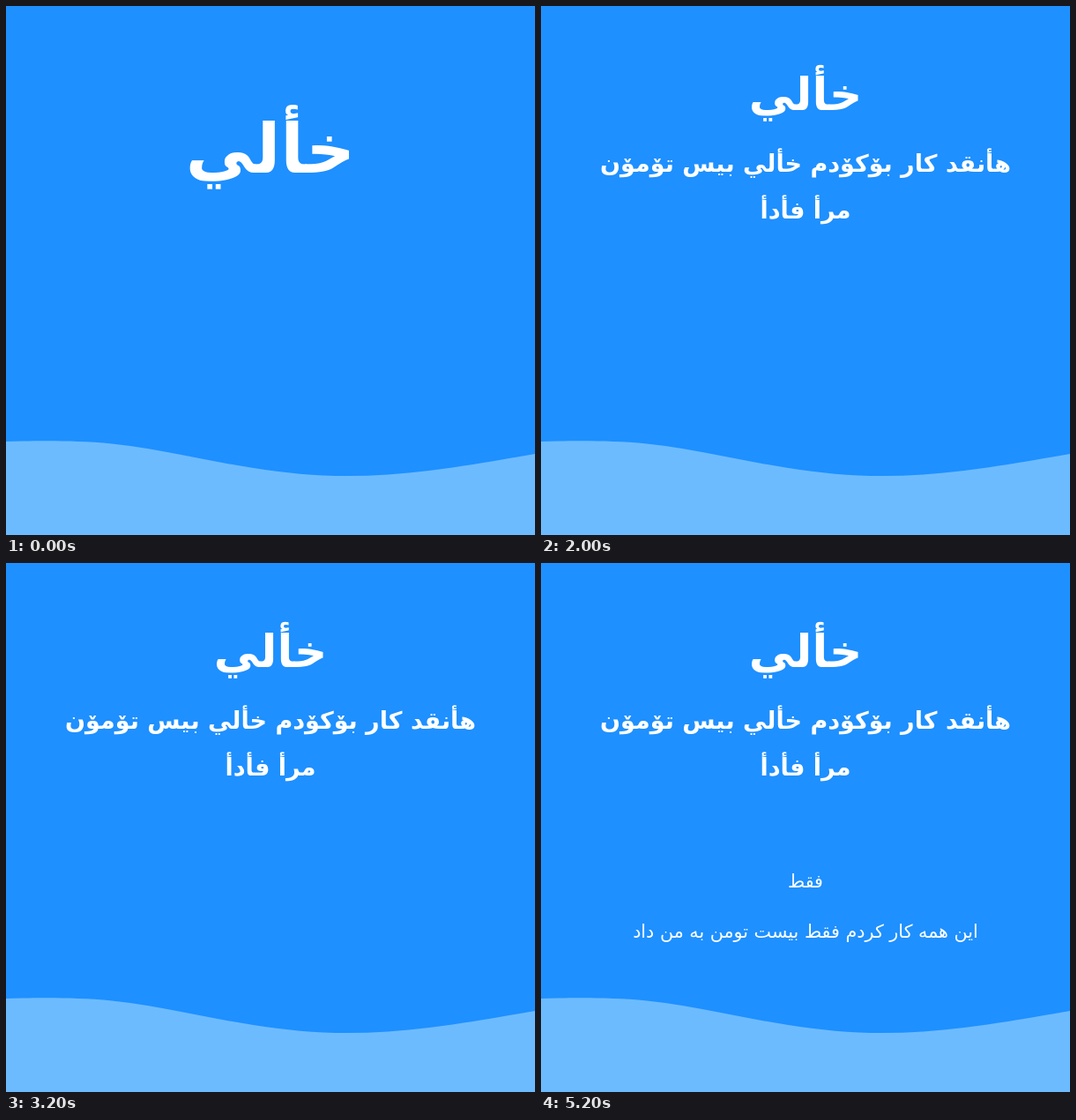
These frames come from a looping animation (600x600 px, 6 s). An HTML page:

```html
<!DOCTYPE html>
<html lang="fa">
<head>
<meta charset="utf-8">
<style>
  html, body { margin: 0; width: 100%; height: 100%; overflow: hidden; background: #1e90ff; }
  svg { display: block; width: 100%; height: 100%; }
  text {
    font-family: "DejaVu Sans", "Noto Sans", sans-serif;
    fill: #fff;
    text-anchor: middle;
    direction: rtl;
  }
  .bold { font-weight: 700; }
  .sub { font-size: 27px; }
  .note { font-size: 20.7px; }
</style>
</head>
<body>
<svg viewBox="0 0 600 600">
  <rect width="600" height="600" fill="#1e90ff"/>
  <path fill="#6dbbff" d="M0 494L20 493.6C40 493.2 80 492.5 120 496.5C160 500.6 200 509.5 240 517C280 524.5 320 530.7 360 532.5C400 534.3 440 531.8 480 527C520 522.2 560 515.1 580 511.6L600 508V600H0Z"/>
  <text id="title" class="bold" x="300" y="189" font-size="77.5">خألي</text>
  <g id="meaning" class="bold sub">
    <text x="300" y="188">هأنقد کار بۆکۆدم خألي بيس تۆمۆن</text>
    <text x="300" y="241">مرأ فأدأ</text>
  </g>
  <g id="notes" class="note">
    <text x="300" y="368">فقط</text>
    <text x="300" y="425">این همه کار کردم فقط بیست تومن به من داد</text>
  </g>
</svg>
<script>
  const LOOP = 6000, STEP = 2000;
  const [title, meaning, notes] = ["title", "meaning", "notes"].map(id => document.getElementById(id));
  const show = (el, on) => el.setAttribute("visibility", on ? "visible" : "hidden");

  function draw(ms) {
    const step = Math.floor((ms % LOOP) / STEP);
    title.setAttribute("y", step ? 118 : 189);
    title.setAttribute("font-size", step ? 51.7 : 77.5);
    show(meaning, step > 0);
    show(notes, step > 1);
  }

  const start = performance.now();
  function tick() {
    draw(performance.now() - start);
    requestAnimationFrame(tick);
  }
  tick();
</script>
</body>
</html>
```
